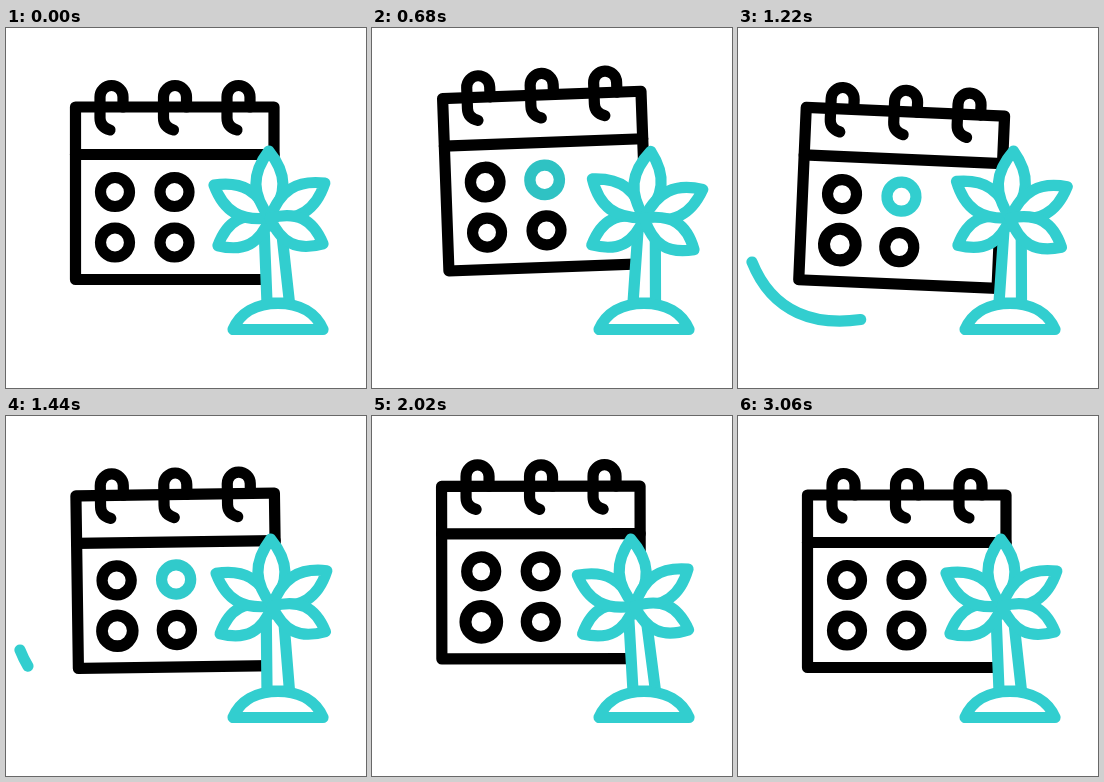
An HTML page that plays this animation: 360 px wide and 360 px high, repeating every 3.6 s.

```html
<!DOCTYPE html>
<html lang="en">
<head>
<meta charset="utf-8">
<title>Holiday calendar</title>
<style>
html, body { margin: 0; width: 100%; height: 100%; overflow: hidden; background: #fff; }
svg { display: block; width: 100vw; height: 100vh; }
path, rect, circle { stroke-width: 11.2; stroke-linecap: round; stroke-linejoin: round; }
#cal { stroke: #000; fill: none; }
#palm { stroke: #32cecf; fill: #fff; }
#lines { stroke: #32cecf; fill: none; }
</style>
</head>
<body>
<svg viewBox="0 0 360 360">
  <g id="cal">
    <rect x="69.5" y="79" width="198.5" height="172.5" fill="#fff"/>
    <path d="M69.5 126.5H268"/>
  </g>
  <g id="palm">
    <path id="trunk"/>
    <path d="M227 301.5H317C310 285 294 275.5 272 275.5S234 285 227 301.5Z"/>
    <g id="crown"></g>
  </g>
  <g id="lines"></g>
</svg>
<script>
const LOOP = 3600, MID = 1220, BEAT = 800;
const $ = id => document.getElementById(id);
const add = (parent, tag, attrs) => {
  const el = document.createElementNS('http://www.w3.org/2000/svg', tag);
  for (const k in attrs) el.setAttribute(k, attrs[k]);
  return parent.appendChild(el);
};
// Smooth 0 to 1 between times a and b
const ramp = (t, a, b) => (1 - Math.cos(Math.PI * Math.min(1, Math.max(0, (t - a) / (b - a))))) / 2;
const pulse = (t, peak) => ramp(Math.abs(t - peak), 300, 0);

for (let i = 0; i < 3; i++)
  add($('cal'), 'path', {
    d: 'M117 79V69A11.5 11.5 0 0 0 94 69V90Q94 99 104 102',
    transform: `translate(${63.5 * i})`
  });

const dots = [0, 1, 2, 3].map(i => add($('cal'), 'circle', {
  cx: 109 + 59.5 * (i % 2), cy: 164 + 50.5 * (i >> 1)
}));

const leaves = [-2, -1, 0, 1, 2].map(k => {
  const len = 67 - 2 * k * k, low = len * .36, high = len * .66;
  return add($('crown'), 'path', { d: `M0 0C-18 ${-low} -18 ${-high} 0 ${-len}C18 ${-high} 18 ${-low} 0 0Z` });
});

const addLine = d => add($('lines'), 'path', { d, pathLength: 100 });
const swoosh = addLine('M141 288C92 300 38 294 14 234');
const rays = [-1, 0, 1].map(k => {
  const a = (20 + 38 * k) * Math.PI / 180;
  return addLine(`M${308.5 + 23.5 * k} ${113 + 9 * k}l${19 * Math.sin(a)} ${-19 * Math.cos(a)}`);
});

// Show the part of a line between tail and head (0 to 1)
function trim(el, head, tail) {
  const shown = 100 * (head - tail);
  el.style.visibility = shown > .1 ? 'visible' : 'hidden';
  el.setAttribute('stroke-dasharray', `${shown} 300`);
  el.setAttribute('stroke-dashoffset', -100 * tail);
}

function drawCalendar(t) {
  // The second half of the hop mirrors the first
  const s = MID - Math.abs(t - MID);
  const turn = 5.3 * ramp(s, 840, MID) - 2.8 * ramp(s, 360, 840);
  const lift = 9.7 * (ramp(s, 740, 900) - ramp(s, 200, 480)) + 2 * ramp(s, 900, MID);
  $('cal').setAttribute('transform', `translate(0 ${lift}) rotate(${turn} 105 50)`);

  dots.forEach((dot, i) => {
    const peak = 900 + BEAT / 2 * Math.max(0, i - 1);
    const swell = pulse(t, peak) + pulse(t, peak + BEAT);
    dot.setAttribute('r', 14.5 + 1.6 * swell);
    dot.style.strokeWidth = 11.2 + swell;
  });
  const tint = ramp(t, 470, 720) - ramp(t, 1420, 1660);
  dots[1].style.stroke = `rgb(${50 * tint},${206 * tint},${207 * tint})`;
}

function drawPalm(t) {
  const sway = 9.8 * ramp(t, 200, 860) - 13.1 * ramp(t, 860, 1700) + 3.3 * ramp(t, 1700, 2880);
  const x = 264 + 10 * ramp(t, 200, 860) - 12 * ramp(t, 1060, 1700) + 2 * ramp(t, 1700, 2600);
  $('crown').setAttribute('transform', `translate(${x} 190)`);
  leaves.forEach((leaf, i) => {
    const share = Math.min(.8, .1 + .7 * i);
    leaf.setAttribute('transform', `rotate(${58.5 * (i - 2) - 1 + sway * share})`);
  });
  $('trunk').setAttribute('d', `M${x - 6} 198L261 275H283.5L${x + 11} 198Z`);
}

function frame() {
  const t = performance.now() % LOOP;
  drawCalendar(t);
  drawPalm(t);
  trim(swoosh, ramp(t, 680, 1080), ramp(t, 1130, 1530));
  for (const ray of rays) trim(ray, ramp(t, 2300, 2500), ramp(t, 2480, 2760));
  requestAnimationFrame(frame);
}
frame();
</script>
</body>
</html>
```
